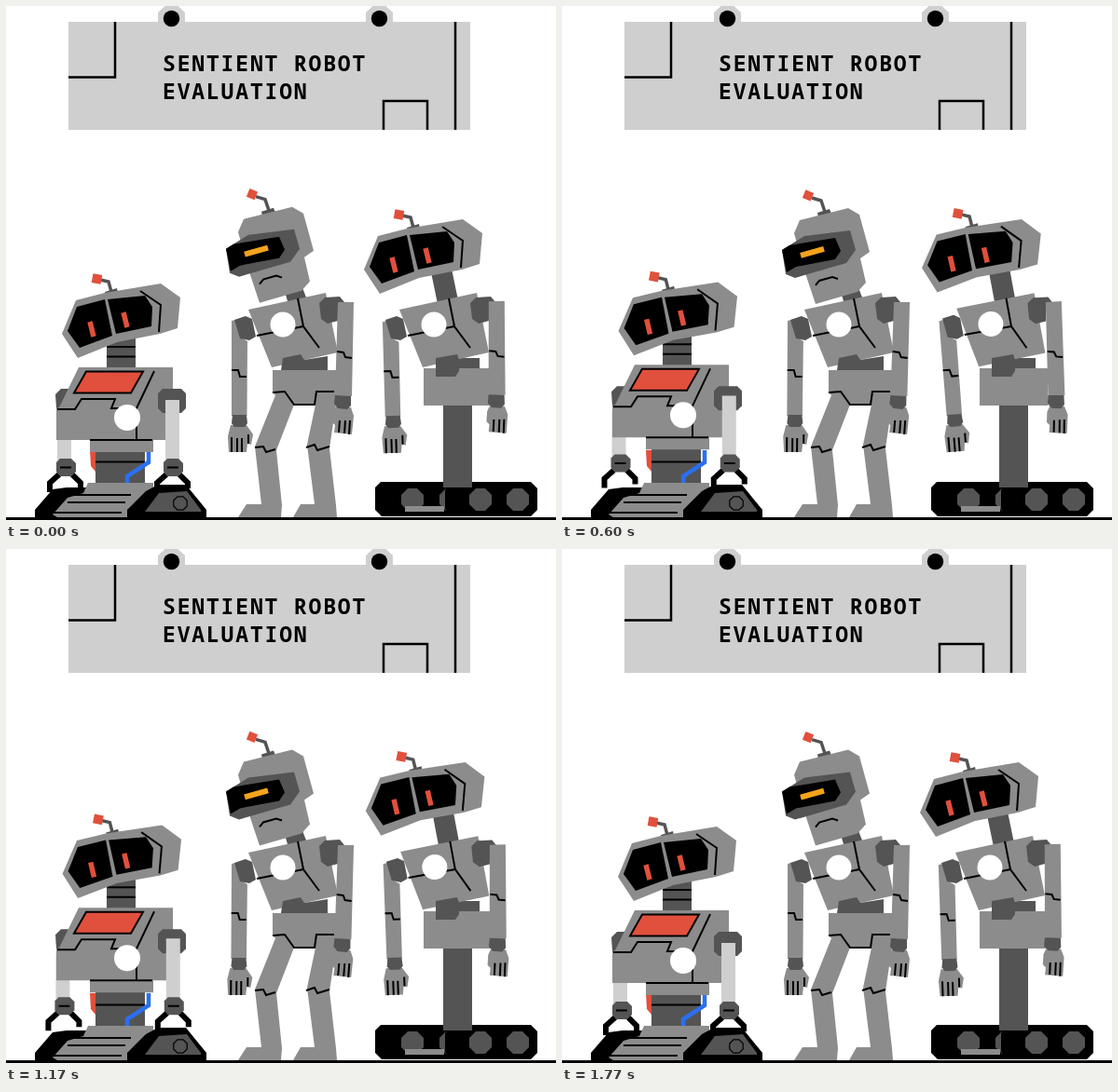
An HTML page for the animation above (1800 ms loop, 590 px wide and 553 px high).

```html
<!DOCTYPE html>
<html lang="en">
<head>
<meta charset="utf-8">
<title>Robot evaluation</title>
<style>
html, body { margin: 0; width: 100%; height: 100%; overflow: hidden; background: #fff; }
svg { display: block; }
.g { fill: #8c8c8c; }
.d { fill: #545454; }
.b { fill: #000; }
.p { fill: #cfcfcf; }
.w { fill: #fff; }
.r { fill: #e1503c; }
.l { fill: none; stroke: #000; stroke-width: 2; }
.stem { fill: none; stroke: #545454; stroke-width: 3.5; }
.claw { fill: none; stroke: #000; stroke-width: 6; }
text { font: bold 23px "Noto Sans Mono", "DejaVu Sans Mono", monospace; letter-spacing: 1.7px; }
</style>
</head>
<body>
<svg width="590" height="553" viewBox="0 0 590 553">
<defs>
  <path id="hook" class="p" d="M-14.5 18V7L-7 0H7L14.5 7V18z"/>
  <path id="octagon" d="M-5-12H5L12-5V5L5 12H-5L-12 5V-5z"/>

  <g id="armL">
    <path class="g" d="M242 338L250 336 254 357 259 360 258.500 440H242z"/>
    <path class="l" d="M242 391H249L251 398H258"/>
    <path class="g" d="M241 450H258L265 460 263 471 259 470 258 479H239L238 462z"/>
    <path class="d" d="M243 439H258L259 448 256 452H245L242 448z"/>
    <path class="l" d="M242 463V479M248 464V479M253 464V479M260 460V470"/>
  </g>
  <g id="armR">
    <path class="g" d="M356 318H373L371 419H353z"/>
    <path class="l" d="M355 371L362 372 364 377 371 378"/>
    <path class="g" d="M354 430L370 431 373 440 371 460 352 458 353 450 350 447 351 436z"/>
    <path class="d" d="M353 418L370 419V429L366 433 356 432 352 427z"/>
    <path class="l" d="M358 445L357 458M364 445L363 459M369 445L368 460"/>
  </g>
  <path id="shoulderL" class="d" d="M245 337L257 333 264 336 268 355 261 359 251 357z"/>
  <path id="shoulderR" class="d" d="M336 319L342 313 358 312 363 318 356 319V338L345 341 338 336z"/>
  <g id="torso">
    <path class="g" d="M260 326L343 308 356 372 285 388z"/>
    <path class="l" d="M313 314L319 344 336 367M319 344L269 354"/>
    <circle class="w" cx="297" cy="342" r="13.5"/>
  </g>

  <g id="head">
    <path class="stem" d="M425 225L434 227 437 238"/>
    <path class="d" d="M430 238L443 234 444 239 431 243z"/>
    <rect class="r" x="-5" y="-5" width="10" height="10" transform="translate(421.500 224) rotate(10)"/>
    <path class="g" d="M384 283L399 247 430 239 490 229 511 244 508 277 489 283 443 292 401 309z"/>
    <path class="b" d="M390 280L400 254 430 246 438 285 403 298z"/>
    <path class="b" d="M433 246L473 242 481 254 480 275 442 283z"/>
    <path d="M414 270L418 286M450 260L454 276" stroke="#e1503c" stroke-width="5.5"/>
    <path class="l" d="M468 237L490 252 488 281"/>
  </g>

  <g id="claw">
    <path class="claw" d="M47 522V512L57 503M71 503L80 512V518"/>
    <path class="d" d="M54 490L58 486H70L75 491V500L70 505H58L54 500z"/>
    <path class="l" d="M58 495.500H70"/>
  </g>
</defs>

<use href="#hook" x="177.500"/><use href="#hook" x="400.500"/>
<path class="p" d="M67 17H498V133H67z"/>
<circle cx="177.500" cy="13.500" r="8.700"/><circle cx="400.500" cy="13.500" r="8.700"/>
<path class="l" style="stroke-width:2.5" d="M67 76.500H117V17M482 17V133M405 133V102H452V133"/>
<text x="168" y="70" style="letter-spacing:1.85px">SENTIENT ROBOT</text>
<text x="168" y="100" style="letter-spacing:1.85px">EVALUATION</text>
<rect y="549" width="590" height="3"/>

<!-- short robot -->
<path class="d" d="M96 476H149V513H96z"/>
<path class="l" d="M96 489.500H149"/>
<path class="r" d="M90 477H96V500L91 494z"/>
<path d="M153 477V490L130 505V513" fill="none" stroke="#2b6ff0" stroke-width="4.500"/>
<path class="b" d="M31 549V541L50 519 65 517H90V549z"/>
<path class="g" d="M88 512H158V520L132 549H55L50 546 66 528 83 523z"/>
<path class="l" d="M70 525H134M66 533H128M50 544H124"/>
<path class="b" d="M130 549V541L150 521 163 514H193L215 541V549z"/>
<path class="d" d="M149 543L164 523 194 521 209 541V543z"/>
<use href="#octagon" class="l" transform="translate(187 534) scale(.6)"/>
<g id="gripL"><path class="p" d="M55 440H70V488H55z"/><use href="#claw"/></g>
<g id="body1">
  <path class="g" d="M90 466H158V479H90z"/>
  <path class="d" d="M53 417L59 411H68L62 432H54z"/>
  <path class="d" d="M108 352H139V389H108z"/>
  <path class="l" d="M108 366H139M108 376.500H139"/>
  <path class="g" d="M78 388H179V466H54V432L57 431z"/>
  <path class="l" d="M90 466H157M55 433H74L81 422H117L113 432H140L159 392M140 432V466"/>
  <path class="r" d="M86 392.500H147L134 415.500H73z" stroke="#000" stroke-width="2"/>
  <circle class="w" cx="130" cy="442" r="14"/>
  <path class="d" d="M163 416L168 411H188L193 416V432L188 437H168L163 432z"/>
</g>
<g id="gripR"><path class="p" d="M171 423H186V488H171z"/><use href="#claw" x="115"/></g>
<g id="head1"><use href="#head" x="-324" y="69"/></g>

<!-- tall robot -->
<path class="g" d="M286 391H356V414L347 475 354 536 355 549H308L316 535H331L323 471 332 428H309L290 477 296 536 295 549H249L258 535H274L267 473 289 418 286 415z"/>
<path class="l" d="M286 415L299 414 309 428H331L333 414H352M267 474L276 473 279 479 289 476M322 474L331 471 334 477 347 473"/>
<use id="armL2" href="#armL"/>
<use href="#shoulderL"/>
<path class="d" d="M299 307L317 300 324 318 303 320z"/>
<use href="#torso"/>
<path class="d" d="M295 391L297 378 316 374 320 380 345 376V391z"/>
<use href="#shoulderR"/>
<use id="armR2" href="#armR"/>
<g id="head2">
  <path class="stem" d="M268 205L278 208 282 220"/>
  <path class="d" d="M274 221L287 217 289 222 275 226z"/>
  <rect class="r" x="-4.700" y="-4.700" width="9.400" height="9.400" transform="translate(264 202.500) rotate(22)"/>
  <path class="g" d="M249 243L255 229 307 216 319 223 330 263 320 270 326 296 317 306 272 319 261 286z"/>
  <path class="d" d="M236 261L260 246 309 240 315 261 305 275 250 291 240 287z"/>
  <path class="b" d="M236 261L244 256 293 248 299 262 293 271 251 279 241 285z"/>
  <path d="M256 267L281 260" stroke="#f4a31c" stroke-width="6"/>
  <path class="l" d="M272 299L276 294 290 290 296 292"/>
</g>

<!-- tracked robot -->
<path class="b" d="M396 517L402 511H563L570 518V541L563 548H403L396 541z"/>
<g class="d">
  <use href="#octagon" x="436" y="530"/>
  <use href="#octagon" x="477" y="530"/>
</g>
<path class="b" d="M471 520L478 511H520V548H478L471 540z"/>
<g class="d">
  <use href="#octagon" x="509" y="530"/>
  <use href="#octagon" x="549" y="530"/>
</g>
<path class="d" d="M469 425H500V517H469z"/>
<path class="g" d="M428 537H470V543H428z"/>
<path class="d" d="M461 378H508V392H461z"/>
<path class="g" d="M448 389H521V429H448z"/>
<g id="body3">
  <use id="armL3" href="#armL" x="162" y="1"/>
  <use href="#shoulderL" x="162"/>
  <path class="d" d="M456 286L478 282 485 316 463 320z"/>
  <use href="#torso" x="162"/>
  <use href="#shoulderR" x="162"/>
  <use id="armR3" href="#armR" x="162" y="-1"/>
  <use href="#head"/>
</g>
<path class="d" d="M461 378L484 374 486 380V392L482 398H461z"/>
</svg>
<script>
const LOOP = 1800;
const set = (id, value) => document.getElementById(id).setAttribute('transform', value);
const move = (id, x, y) => set(id, `translate(${x} ${y})`);
const turn = (id, angle, x, y) => set(id, `rotate(${angle} ${x} ${y})`);
// Swings smoothly from 0 to 1 and back once per period.
const swing = (t, period, delay = 0) => (1 - Math.cos(2 * Math.PI * (t - delay) / period)) / 2;

function draw(now) {
  const t = now % LOOP;
  const lift = swing(t, LOOP);
  const sway = swing(t, LOOP / 2);
  const lag = swing(t, LOOP / 2, 80);

  move('body1', 0, -3.5 * lift);
  move('gripL', -2 * lift, -6 * lift);
  move('gripR', lift, -6 * lift);
  set('head1', `translate(${0.5 * lift} ${-2.8 * lift}) rotate(${1.1 * lift} 123 360)`);

  move('head2', 0, Math.sin(2 * Math.PI * (t - 100) / LOOP));
  turn('armL2', 0.5 * sway, 253, 345);
  turn('armR2', 0.5 * sway, 361, 325);

  turn('body3', 1.4 * sway, 487, 395);
  turn('armL3', -1.3 - 4.6 * lag, 414, 345);
  turn('armR3', -1.4 - 3 * lag, 523, 325);
  requestAnimationFrame(draw);
}
draw(0);
</script>
</body>
</html>
```
